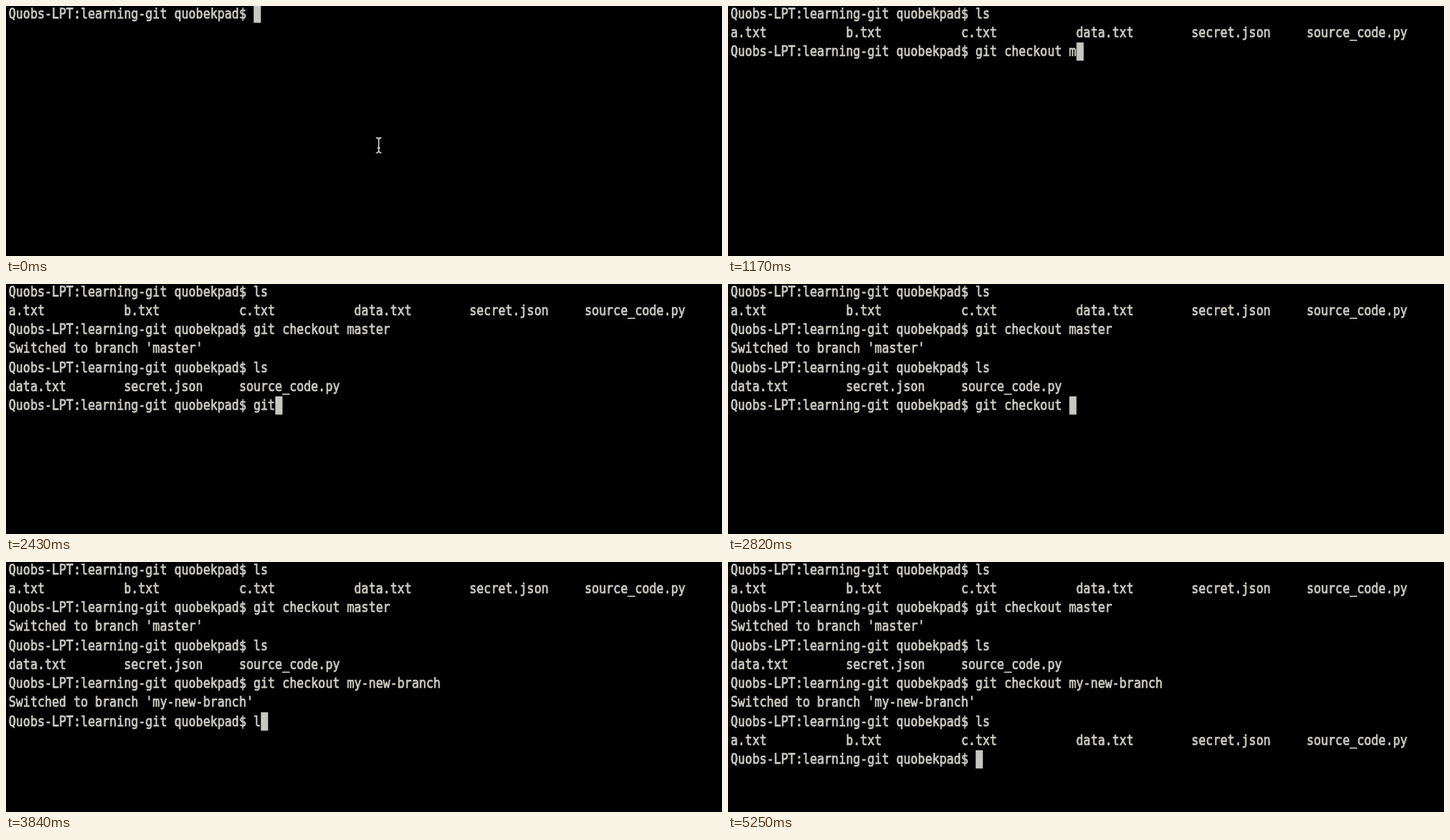
Animation of 800 by 280 pixels, one loop 5.28 s. Source, as an HTML page with a canvas:

```html
<!DOCTYPE html>
<html lang="en">
<head>
<meta charset="utf-8">
<title>Terminal</title>
<style>
html, body { margin: 0; width: 100%; height: 100%; overflow: hidden; background: #000; }
canvas { display: block; }
</style>
</head>
<body>
<canvas id="stage" width="800" height="280"></canvas>
<script>
const ctx = document.getElementById('stage').getContext('2d');
const LOOP = 5280, TICK = 30;
const LEFT = 3, CELL = 8.05, ROW = 21.25, BASE = 13.5, TALL = 1.23;
const INK = '#d2d1c8', BLOCK = '#c8c8c2';
const PROMPT = 'Quobs-LPT:learning-git quobekpad$ ';

const columns = names => names.map(n => n.padEnd(16)).join('').trimEnd();
const shared = ['data.txt', 'secret.json', 'source_code.py'];
const branchFiles = columns(['a.txt', 'b.txt', 'c.txt', ...shared]);
const masterFiles = columns(shared);

// Each burst is [text, time of first key, time of last key].
const commands = [
  { bursts: [['ls', 30, 150]], enter: 330, output: branchFiles },
  { bursts: [['git', 630, 750], [' checkout ', 780, 1140], ['master', 1170, 1380]],
    enter: 1500, output: "Switched to branch 'master'" },
  { bursts: [['ls', 1830, 1920]], enter: 2040, output: masterFiles },
  { bursts: [['git', 2310, 2430], [' checkout ', 2460, 2820], ['my-new-branch', 3030, 3480]],
    enter: 3570, output: "Switched to branch 'my-new-branch'" },
  { bursts: [['ls', 3840, 3930]], enter: 4050, output: branchFiles }
];

function typed([text, from, to], t) {
  if (t < from) return '';
  const step = (to - from) / (text.length - 1);
  return text.slice(0, Math.floor((t - from) / step + 1e-6) + 1);
}

function screenAt(t) {
  const lines = [];
  for (const c of commands) {
    lines.push(PROMPT + c.bursts.map(b => typed(b, t)).join(''));
    if (t < c.enter) return lines;
    lines.push(c.output);
  }
  lines.push(PROMPT);
  return lines;
}

// The thin outline gives the letters a medium weight.
function drawLine(text, row) {
  ctx.save();
  ctx.translate(LEFT, BASE + row * ROW);
  ctx.scale(1, TALL);
  ctx.fillText(text, 0, 0);
  ctx.strokeText(text, 0, 0);
  ctx.restore();
}

function drawPointer(x, y) {
  ctx.lineWidth = 1.3;
  ctx.beginPath();
  for (const s of [-1, 1]) {
    ctx.moveTo(x - 3, y + s * 8.5);
    ctx.quadraticCurveTo(x, y + s * 8.5, x, y + s * 6);
    ctx.quadraticCurveTo(x, y + s * 8.5, x + 3, y + s * 8.5);
  }
  ctx.moveTo(x, y - 6);
  ctx.lineTo(x, y + 6);
  ctx.moveTo(x - 1.5, y + 3);
  ctx.lineTo(x + 1.5, y + 3);
  ctx.stroke();
}

function draw(t) {
  ctx.fillStyle = '#000';
  ctx.fillRect(0, 0, 800, 280);
  ctx.font = '13.37px "DejaVu Sans Mono", monospace';
  ctx.fillStyle = ctx.strokeStyle = INK;
  ctx.lineWidth = 0.5;
  ctx.lineJoin = 'round';
  const lines = screenAt(t);
  lines.forEach(drawLine);
  const last = lines.length - 1;
  ctx.fillStyle = BLOCK;
  ctx.fillRect(LEFT + lines[last].length * CELL, last * ROW - 1.7, CELL, 20.5);
  if (t < TICK) drawPointer(416.5, 156);
}

const start = performance.now();
function frame(now) {
  const t = Math.max(0, now - start) % LOOP;
  draw(Math.floor(t / TICK) * TICK);
  requestAnimationFrame(frame);
}
draw(0);
requestAnimationFrame(frame);
</script>
</body>
</html>
```
